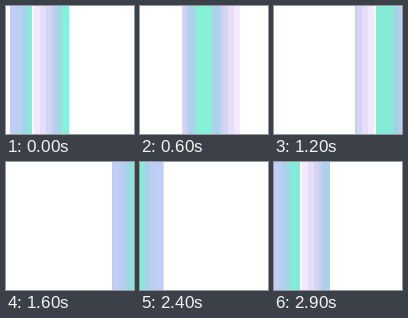
These frames come from a looping animation (128 by 128 pixels, 3000 ms). An HTML page with a canvas:

```html
<!DOCTYPE html>
<html lang="en">
<head>
<meta charset="utf-8">
<title>Sweep</title>
<style>
  html, body { margin: 0; width: 100%; height: 100%; overflow: hidden; background: #fff; }
  canvas { display: block; width: 128px; height: 128px; }
</style>
</head>
<body>
<canvas id="stage" width="128" height="128"></canvas>
<script>
const ctx = document.getElementById('stage').getContext('2d');
const SIZE = 128, LOOP = 3000, STEP = 100;
const TRAVEL = SIZE * 1.5, HALF = SIZE / 4;
const INNER_LEFT = SIZE * 0.2, INNER_RIGHT = SIZE * 0.8;

// Bands mirrored around a centre: [distance from centre, colour], outermost first.
const innerBands = [
  [38.4, '#fcfaff'], [36, '#f2eafc'], [30, '#e6def8'], [24, '#d6d4f4'],
  [19, '#c4cff1'], [15.5, '#a9d3e8'], [8, '#86f1d8']
];
const outerBands = [
  [30, '#c0cdf6'], [22, '#b9cef0'], [16, '#a4d2e6'], [10, '#84ebd7']
];

function drawBands(bands, centre) {
  for (const [reach, colour] of bands) {
    ctx.fillStyle = colour;
    ctx.fillRect(centre - reach, 0, reach * 2, SIZE);
  }
}

function clipped(left, right, draw) {
  ctx.save();
  ctx.beginPath();
  ctx.rect(left, 0, right - left, SIZE);
  ctx.clip();
  draw();
  ctx.restore();
}

function render(time) {
  const t = Math.floor((time % LOOP) / STEP) * STEP;
  let centre = HALF + TRAVEL * t / LOOP;
  if (centre - HALF >= SIZE) centre -= TRAVEL;

  ctx.fillStyle = '#fff';
  ctx.fillRect(0, 0, SIZE, SIZE);

  // The sweep reveals a fixed gradient in the middle and carries its own outside it.
  clipped(Math.round(centre - 28), Math.round(centre + 30.5), () => {
    drawBands(outerBands, centre);
    clipped(Math.round(INNER_LEFT), Math.round(INNER_RIGHT),
      () => drawBands(innerBands, SIZE / 2));
  });
}

const start = performance.now();
function frame() {
  render(performance.now() - start);
  requestAnimationFrame(frame);
}
frame();
</script>
</body>
</html>
```
